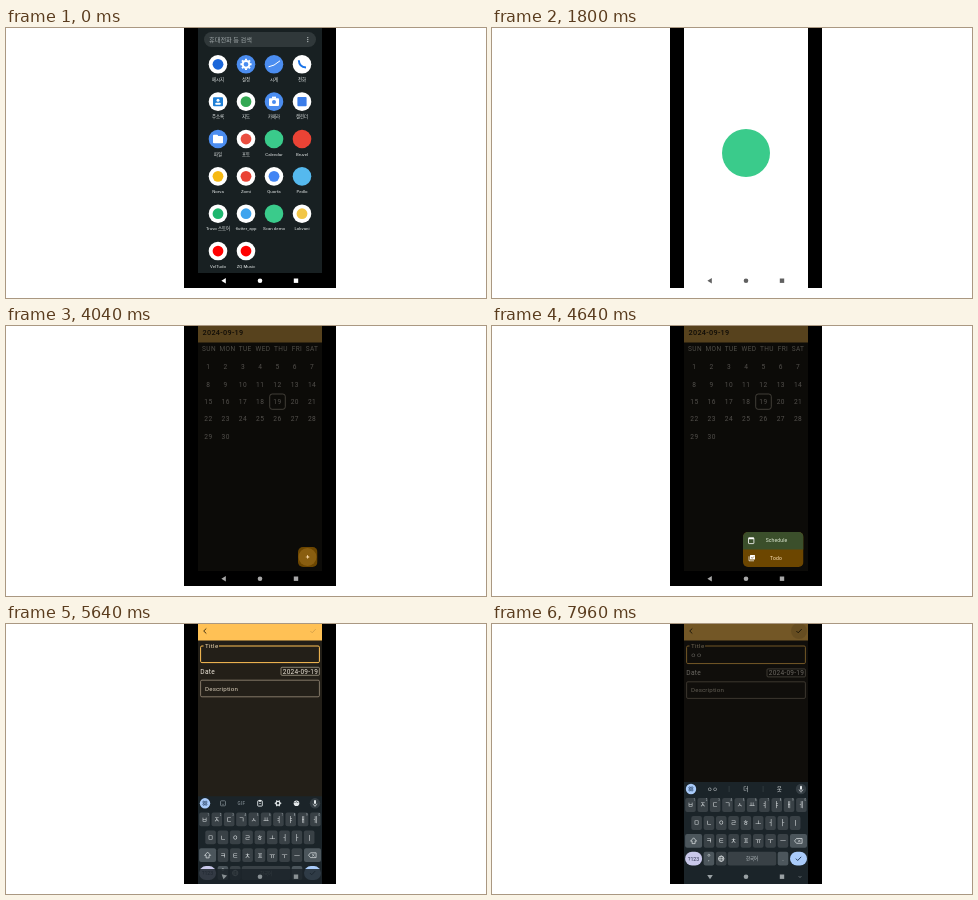
Write an HTML page with a canvas that moves like this. It is 480x270 px and loops after 8000 ms.

```html
<!DOCTYPE html>
<html lang="ko">
<head>
<meta charset="utf-8">
<style>
html, body { margin: 0; width: 100%; height: 100%; overflow: hidden; background: #fff; }
canvas { display: block; }
</style>
</head>
<body>
<canvas id="stage" width="480" height="270"></canvas>
<script>
const ctx = document.getElementById('stage').getContext('2d');
const LOOP = 8000, LEFT = 192, WIDTH = 124, HEIGHT = 260, NAV_TOP = 245;
const AMBER = '#ffc155', PAGE = '#231f18', CREAM = '#eee7da', BROWN = '#6c4600', GREEN = '#3acb8b';
const FONT = 'Roboto, "Noto Sans CJK KR", sans-serif';

const clamp = v => Math.max(0, Math.min(1, v));
const mix = (a, b, p) => a + (b - a) * p;
const span = (t, from, to) => clamp((t - from) / (to - from));
const easeOut = p => 1 - (1 - p) ** 3;
const easeInOut = p => p * p * (3 - 2 * p);

function rect(x, y, w, h, color, r = 0) {
  ctx.fillStyle = color;
  ctx.beginPath();
  ctx.roundRect(x, y, w, h, r);
  ctx.fill();
}

function outline(x, y, w, h, color, r = 0, width = 0.8) {
  ctx.strokeStyle = color;
  ctx.lineWidth = width;
  ctx.beginPath();
  ctx.roundRect(x, y, w, h, r);
  ctx.stroke();
}

function disc(x, y, r, color) {
  ctx.fillStyle = color;
  ctx.beginPath();
  ctx.arc(x, y, r, 0, 7);
  ctx.fill();
}

function ring(x, y, r, color, width = 0.8) {
  ctx.strokeStyle = color;
  ctx.lineWidth = width;
  ctx.beginPath();
  ctx.arc(x, y, r, 0, 7);
  ctx.stroke();
}

// Points are a flat x, y list relative to (x, y).
function path(x, y, points, color, width = 0) {
  ctx.beginPath();
  for (let i = 0; i < points.length; i += 2) ctx.lineTo(x + points[i], y + points[i + 1]);
  if (width) {
    ctx.strokeStyle = color;
    ctx.lineWidth = width;
    ctx.stroke();
  } else {
    ctx.fillStyle = color;
    ctx.fill();
  }
}

function text(str, x, y, size, color, { align = 'center', weight = 400, spacing = 0 } = {}) {
  ctx.font = `${weight} ${size}px ${FONT}`;
  ctx.letterSpacing = spacing + 'px';
  ctx.textAlign = align;
  ctx.fillStyle = color;
  ctx.fillText(str, x, y + size * 0.355);
}

function layer(alpha, draw) {
  if (alpha <= 0) return;
  ctx.save();
  ctx.globalAlpha *= alpha;
  draw();
  ctx.restore();
}

const shade = (alpha, bottom) => rect(LEFT, 0, WIDTH, bottom, `rgba(0,0,0,${alpha})`);

function navBar(color, background, typing = 0) {
  rect(LEFT, NAV_TOP, WIDTH, HEIGHT - NAV_TOP, background);
  ctx.save();
  ctx.translate(218, 252.7);
  ctx.rotate(-typing * Math.PI / 2);
  path(0, 0, [-2.6, 0, 1.8, -2.8, 1.8, 2.8], color);
  ctx.restore();
  disc(254, 252.7, 2.3, color);
  rect(287.8, 250.5, 4.4, 4.4, color);
  if (typing === 1) path(308, 252.8, [-1.3, -0.6, 0, 0.7, 1.3, -0.6], color, 0.6);
}

// App drawer

const glyphs = {
  gear(x, y) {
    for (let i = 0; i < 8; i++) {
      const a = i * Math.PI / 4;
      path(x, y, [Math.cos(a) * 4, Math.sin(a) * 4, Math.cos(a) * 5.6, Math.sin(a) * 5.6], '#fff', 2);
    }
    ring(x, y, 3.4, '#fff', 2);
  },
  clock: (x, y) => path(x, y, [-5.5, 2.5, 0, 0.8, 6, -3.5], '#fff', 1),
  phone(x, y) {
    ctx.strokeStyle = '#1a73e8';
    ctx.lineWidth = 2;
    ctx.beginPath();
    ctx.moveTo(x - 3.2, y - 4);
    ctx.quadraticCurveTo(x - 2.8, y + 2.8, x + 4, y + 3.2);
    ctx.stroke();
  },
  contact(x, y) {
    rect(x - 5, y - 4.5, 10, 9, '#1f7fd6', 1);
    disc(x, y - 1.3, 1.5, '#fff');
    rect(x - 2.8, y + 1, 5.6, 2, '#fff', 1);
  },
  camera(x, y) {
    rect(x - 5, y - 3.5, 10, 7.8, '#fff', 1);
    rect(x - 2, y - 5, 4, 2, '#fff');
    disc(x, y + 0.4, 2, '#4b8df0');
  },
  folder(x, y) {
    rect(x - 5, y - 4.2, 5, 3, '#fff', 0.8);
    rect(x - 5, y - 3, 10, 7.2, '#fff', 0.8);
  },
  block: (x, y) => rect(x - 4.6, y - 4.6, 9.2, 9.2, '#3b7de9', 1)
};

// [label, background, inner colour or glyph]
const apps = [
  ['메시지', '#fff', '#1a66d9'], ['설정', '#4b8df0', 'gear'], ['시계', '#4b8df0', 'clock'], ['전화', '#fff', 'phone'],
  ['주소록', '#fff', 'contact'], ['지도', '#fff', '#34a853'], ['카메라', '#4b8df0', 'camera'], ['캘린더', '#fff', 'block'],
  ['파일', '#4b8df0', 'folder'], ['포토', '#fff', '#ea4d3f'], ['Calendar', GREEN], ['Bruvel', '#ea4335'],
  ['Norva', '#fff', '#f6b913'], ['Zomi', '#fff', '#ea4335'], ['Quorfa', '#fff', '#4285f4'], ['Pedlo', '#55b9ee'],
  ['Truvo 스토어', '#fff', '#1fb76f'], ['flutter_app', '#fff', '#3fa4ee'], ['Scan demo', GREEN], ['Lokvani', '#fff', '#f2c646'],
  ['VelTudo', '#fff', '#f00'], ['ZQ Music', '#fff', '#f00']
];

function drawer() {
  rect(LEFT, 0, WIDTH, HEIGHT, '#182022');
  rect(198, 4, 112, 15, '#30383a', 7.5);
  text('휴대전화 등 검색', 203, 11.7, 6.2, '#a3abad', { align: 'left' });
  for (let i = -1; i < 2; i++) disc(301.8, 11.6 + i * 2, 0.6, '#d5dadb');
  apps.forEach(([label, background, inner], i) => {
    const x = 212 + (i % 4) * 28, y = 36.3 + Math.floor(i / 4) * 37.35;
    disc(x, y, 9.3, background);
    if (glyphs[inner]) glyphs[inner](x, y);
    else if (inner) disc(x, y, 5.4, inner);
    text(label, x, y + 15, 4.4, '#e4e8e8');
  });
  navBar('#fff', '#000');
}

function launch(t) {
  drawer();
  const p = easeInOut(span(t, 1260, 1760));
  if (p <= 0) return;
  layer(p * 0.6, () => shade(1, HEIGHT));
  layer(clamp(p * 5), () => {
    rect(mix(258.7, LEFT, p), mix(101.7, 0, p), mix(18.6, WIDTH, p), mix(18.6, HEIGHT, p), '#fff', mix(9.3, 0, p));
    disc(mix(268, 254, p), mix(111, 125, p), mix(9.3, 24, p), GREEN);
  });
  layer(span(p, 0.8, 1), () => navBar('#606060', '#fff'));
}

// Calendar

function header() {
  rect(LEFT, 0, WIDTH, HEIGHT, PAGE);
  rect(LEFT, 0, WIDTH, 16.6, AMBER);
}

function calendar(t) {
  header();
  text('2024-09-19', 196.5, 6.9, 7.3, '#2b2111', { align: 'left', weight: 500, spacing: 0.3 });
  const weekdays = { SUN: 203, MON: 221.5, TUE: 239.2, WED: 257, THU: 274.8, FRI: 291, SAT: 306 };
  for (const day in weekdays) text(day, weekdays[day], 23, 6.5, '#e6e2cf', { spacing: 0.35 });
  for (let i = 0; i < 30; i++) {
    text(i + 1, 202.4 + (i % 7) * 17.27, 41 + Math.floor(i / 7) * 17.3, 6.6, CREAM, { spacing: 0.4 });
  }
  outline(263.7, 68, 15.6, 15.3, '#e6dcc5', 2.5);
  navBar('#a8a8a8', '#000');

  const dim = t < 4040 ? 0 : 0.66 * (1 - span(t, 4880, 5160));
  shade(dim, NAV_TOP);
  menu(t);
}

function menu(t) {
  const p = easeInOut(span(t, 4080, 4440));
  const x = mix(292, 251, p), y = mix(221, 206, p), w = 311.5 - x, h = 241 - y;
  ctx.save();
  ctx.beginPath();
  ctx.roundRect(x, y, w, h, 5);
  ctx.clip();
  rect(x, y, w, h, BROWN);
  if (t >= 4040) layer(1 - span(t, 4200, 4600), () => disc(301.5, 231, 9, 'rgba(255,190,80,.2)'));
  layer(1 - p * 2, () => path(301.5, 231, [-1.7, 0, 1.7, 0, 0, 0, 0, -1.7, 0, 1.7], '#ffdfae', 0.7));
  layer(p * 2 - 1, () => {
    rect(x, y, w, h / 2, '#3b4f2b');
    if (t > 4880) {
      ctx.save();
      ctx.beginPath();
      ctx.rect(251, 223.5, 61, 18);
      ctx.clip();
      disc(285, 232, 3 + 8 * span(t, 4880, 5200), 'rgba(255,200,100,.17)');
      ctx.restore();
    }
    outline(256.5, 212, 5.4, 5.6, '#fff', 0.6);
    rect(256.5, 211.6, 5.4, 1.7, '#fff');
    text('Schedule', 284.5, 214.7, 5, '#e1ecd5', { spacing: 0.15 });
    rect(258, 229, 5, 4.6, '#fff', 0.5);
    path(257, 230.3, [0, 0, 0, 4.5, 5, 4.5], '#fff', 0.7);
    path(260.5, 231.5, [-1.2, -0.2, -0.3, 0.8, 1.4, -1], BROWN, 0.6);
    text('Todo', 284, 232, 5, '#ffe3b8', { spacing: 0.15 });
  });
  ctx.restore();
}

// Todo form

const typed = t => 'ㅇ'.repeat((t >= 6720) + (t >= 6880));

function cursorOn(t) {
  return t > 5720 && t < 5860 || t >= 6360 && t < 7400;
}

function form(t) {
  const value = typed(t), shift = value ? 1.6 : 0;
  header();
  path(199, 7, [1.3, -2.5, -1.3, 0, 1.3, 2.5], '#32260f', 0.9);
  path(307, 7, [-2.6, 0, -0.8, 1.8, 2.7, -1.9], value ? '#32260f' : '#d3a04a', 0.9);
  if (t > 7800) disc(307, 7, 3 + 5 * span(t, 7800, 7960), 'rgba(60,40,0,.14)');

  outline(194.6, 22, 118.8, 16.6 + shift * 0.6, AMBER, 1.3, 1);
  rect(197.5, 20.5, 15.5, 3, PAGE);
  text('Title', 199, 21.4, 6.2, '#f2dcb4', { align: 'left', spacing: 0.3 });
  text(value, 198.5, 30.6 + shift * 0.3, 6.2, CREAM, { align: 'left' });
  if (cursorOn(t)) rect(199.3 + value.length * 5.5, 26.2, 0.8, 7.8, AMBER);

  ctx.save();
  ctx.translate(0, shift);
  text('Date', 194.3, 47.2, 6.6, CREAM, { align: 'left', spacing: 0.3 });
  outline(275, 43.3, 38.4, 8, '#b5ab97', 1, 0.7);
  text('2024-09-19', 294.4, 47.3, 6.5, CREAM, { spacing: 0.25 });
  outline(194.6, 56.2, 118.8, 16.6, '#9c8f7b', 1.3, 0.8);
  text('Description', 199, 64.6, 6.2, '#d8cdb9', { align: 'left', spacing: 0.15 });
  ctx.restore();
  navBar('#a8a8a8', '#000');
  shade(0.55 * span(t, 7830, 7950), 158);
}

// Keyboard

const KEY = '#394146', KEYS = '#1b2429', INK = '#e3e8ea', BLUE = '#a9cbfa';

function key(label, x, y, w = 10.6, color = KEY, r = 2, size = 6.6, ink = INK) {
  rect(x - w / 2, y - 6.9, w, 13.8, color, r);
  text(label, x, y, size, ink);
}

function toolbar(value) {
  disc(199, 165, 5.2, BLUE);
  for (let i = 0; i < 4; i++) outline(196.9 + (i % 2) * 2.4, 162.9 + (i >> 1) * 2.4, 1.6, 1.6, '#17304f', 0.4, 0.6);
  disc(309, 165, 5.2, '#343d43');
  rect(308, 161.8, 2, 4, INK, 1);
  path(309, 166, [-2, -0.6, -1.2, 1, 1.2, 1, 2, -0.6], INK, 0.6);
  path(309, 167, [0, 0, 0, 1.6], INK, 0.6);
  if (value) {
    [value, '더', '웃'].forEach((word, i) => text(word, 220.5 + i * 33.4, 164.6, 5.6, INK));
    rect(236.8, 162, 0.5, 6, '#465056');
    rect(270.8, 162, 0.5, 6, '#465056');
    return;
  }
  outline(214.5, 162.5, 5, 5, '#79848a', 0.8);
  path(217, 165, [-1.2, 0.6, 0, 1.3, 1.2, 0.6], '#79848a', 0.6);
  text('GIF', 235.4, 165, 4.6, '#79848a', { weight: 500, spacing: 0.3 });
  outline(251.7, 162.4, 4.6, 5.4, INK, 0.6, 0.9);
  rect(252.8, 161.6, 2.4, 1.8, INK);
  path(254, 165.2, [-1, 0, 1, 0], INK, 0.6);
  ring(272, 165, 1.9, INK, 1.3);
  for (let a = 0; a < 6; a++) disc(272 + 2.7 * Math.cos(a * 1.047), 165 + 2.7 * Math.sin(a * 1.047), 0.7, INK);
  disc(290.5, 165, 2.8, INK);
  for (let i = 0; i < 3; i++) disc(289 + i * 1.4, 164.2 - (i % 2) * 0.7, 0.5, KEYS);
}

function keyboard(t) {
  const p = easeOut(span(t, 5420, 5880));
  if (p <= 0) return;
  const pressed = t >= 6640 && t < 6720 || t >= 6790 && t < 6880;
  ctx.save();
  ctx.translate(0, 102 * (1 - p));
  rect(LEFT, 158, WIDTH, 102, KEYS);
  toolbar(typed(t));
  [...'ㅂㅈㄷㄱㅅㅛㅕㅑㅐㅔ'].forEach((c, i) => {
    const x = 198.5 + i * 12.32;
    key(c, x, 181);
    text((i + 1) % 10, x + 3.8, 176.5, 2.8, '#b4bdc1');
  });
  [...'ㅁㄴㅇㄹㅎㅗㅓㅏㅣ'].forEach((c, i) => {
    const down = pressed && i === 2;
    key(c, 204.6 + i * 12.32, 199, 10.6, down ? '#242d32' : KEY, 2, 6.6, down ? '#68737a' : INK);
  });
  key('', 201.6, 216.9, 17, '#4c565c');
  path(201.6, 216.8, [0, -3, 3, 0.3, 1.5, 0.3, 1.5, 2.8, -1.5, 2.8, -1.5, 0.3, -3, 0.3, 0, -3], INK, 0.7);
  [...'ㅋㅌㅊㅍㅠㅜㅡ'].forEach((c, i) => key(c, 217 + i * 12.32, 216.9));
  key('', 306.5, 216.9, 17, '#4c565c');
  path(306.5, 216.9, [-4, 0, -2, -2.4, 3.6, -2.4, 3.6, 2.4, -2, 2.4, -4, 0], INK, 0.7);
  path(307.3, 216.9, [-1.2, -1.2, 1.2, 1.2], INK, 0.6);
  path(307.3, 216.9, [1.2, -1.2, -1.2, 1.2], INK, 0.6);

  key('?123', 201.6, 234.7, 17, '#c9c8ea', 7, 5.2, '#282c48');
  key(',', 216.9, 234.7, 10.6, '#4c565c', 2, 6);
  ring(216.9, 231.3, 1, INK, 0.5);
  key('', 229.2, 234.7);
  ring(229.2, 234.7, 2.7, INK, 0.8);
  path(229.2, 234.7, [-2.7, 0, 2.7, 0], INK, 0.6);
  ctx.beginPath();
  ctx.ellipse(229.2, 234.7, 1.2, 2.7, 0, 0, 7);
  ctx.stroke();
  key('한국어', 260, 234.7, 48.5, KEY, 2, 4.4, '#c5cdd0');
  key('.', 291, 234.7, 10.6, '#4c565c', 2, 6);
  key('', 306.5, 234.7, 17, BLUE, 7);
  path(306.5, 234.7, [-2.6, 0, -0.8, 1.8, 2.7, -1.9], '#17304f', 0.9);
  if (pressed) {
    rect(218, 173, 22.5, 16.5, '#465056', 6);
    text('ㅇ', 229.2, 181, 8, '#fff');
  }
  ctx.restore();
  layer(p, () => navBar('#9aa1a4', KEYS, p));
}

function render(t) {
  ctx.fillStyle = '#fff';
  ctx.fillRect(0, 0, 480, 270);
  rect(178, 0, 152, HEIGHT, '#000');
  ctx.save();
  ctx.beginPath();
  ctx.rect(LEFT, 0, WIDTH, HEIGHT);
  ctx.clip();
  if (t < 2720) launch(t);
  layer(easeInOut(span(t, 2120, 2640)), () => {
    if (t < 5600) calendar(t);
    const p = easeOut(span(t, 5230, 5560));
    layer(p, () => {
      const scale = mix(0.88, 1, p);
      ctx.translate(254, 122);
      ctx.scale(scale, scale);
      ctx.translate(-254, -122);
      form(t);
    });
    keyboard(t);
  });
  ctx.restore();
}

function tick() {
  render(performance.now() % LOOP);
  requestAnimationFrame(tick);
}
tick();
</script>
</body>
</html>
```
